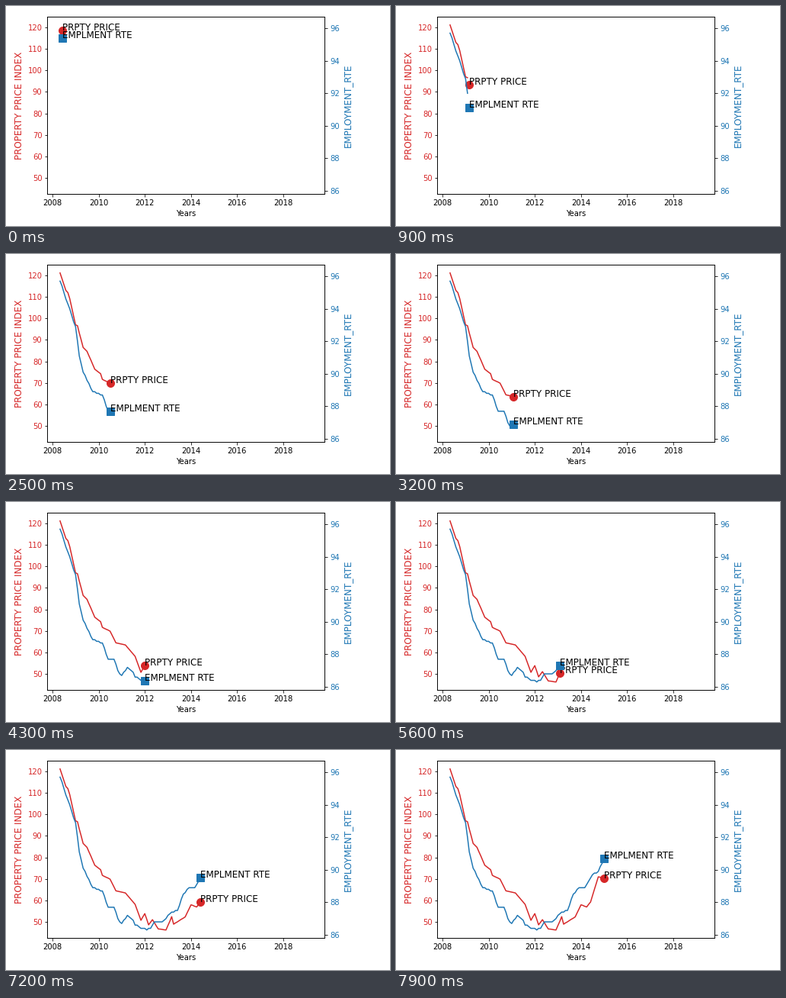
A matplotlib script for the animation above (8000 ms loop, 504 by 288 pixels).

```python
import numpy as np
import matplotlib.pyplot as plt
from matplotlib.animation import FuncAnimation

W, H, DPI = 504, 288, 72
FRAMES = 80


def days(dates):
    return np.array(dates, dtype="datetime64[D]").astype(float)


def curve(*knots):
    """Monthly readings to one decimal through (month, value) knots."""
    months, values = zip(*knots)
    return np.round(np.interp(np.arange(FRAMES + 1), months, values), 1)


def padded(lo, hi, margin=0.05):
    pad = (hi - lo) * margin
    return lo - pad, hi + pad


months = days(np.arange("2008-05", "2019-05", dtype="datetime64[M]"))

price = curve(
    (0, 121.1), (3, 113.0), (4, 112.0), (5, 109.2), (8, 97.0), (9, 96.6),
    (12, 86.5), (14, 84.7), (18, 76.4), (21, 74.3), (22, 71.7), (26, 69.9),
    (29, 64.5), (34, 63.5), (39, 58.2), (42, 50.8), (44, 53.9), (46, 48.7),
    (48, 51.1), (51, 46.8), (55, 46.3), (58, 52.5), (59, 49.0), (65, 52.4),
    (68, 58.0), (71, 57.0), (73, 59.3), (77, 71.0), (80, 70.3))

employment = curve(
    (0, 95.7), (4, 94.3), (8, 92.9), (10, 91.1), (12, 90.1), (17, 88.9),
    (22, 88.7), (25, 87.7), (28, 87.7), (30, 87.0), (32, 86.7), (35, 87.2),
    (38, 86.9), (39, 86.6), (45, 86.3), (47, 86.4), (49, 86.8), (53, 86.8),
    (58, 87.4), (61, 87.5), (64, 88.5), (67, 88.9), (70, 88.9), (74, 89.7),
    (77, 89.9), (80, 90.7))


class Series:
    """A growing line led by a marker with a caption."""

    def __init__(self, ax, values, color, marker, caption):
        self.values = values
        self.line, = ax.plot([], [], color=color, lw=1.5)
        self.head, = ax.plot([], [], color=color, marker=marker, ms=10, ls="")
        self.label = ax.text(months[0], values[0], caption, fontsize=12)

    def show(self, i):
        x, y = months[i + 1], self.values[i + 1]
        self.line.set_data(months[:i + 1], self.values[:i + 1])
        self.head.set_data([x], [y])
        self.label.set_position((x, y))
        return self.line, self.head, self.label


def style_y(ax, name, color, limits, ticks):
    ax.set_ylabel(name, color=color, fontsize=12)
    ax.tick_params(axis="y", labelcolor=color)
    ax.set_ylim(*limits)
    ax.set_yticks(ticks)


fig, left = plt.subplots(figsize=(W / DPI, H / DPI), dpi=DPI)
fig.subplots_adjust(left=54.4 / W, right=418.4 / W,
                    bottom=41.82 / H, top=273.72 / H)
right = left.twinx()

style_y(left, "PROPERTY PRICE INDEX", "tab:red",
        padded(46.3, 121.1), range(50, 121, 10))
style_y(right, "EMPLOYMENT_RTE", "tab:blue",
        padded(86.3, 96.2), range(86, 97, 2))

labels = [str(year) for year in range(2008, 2019, 2)]
left.set_xlabel("Years")
left.set_xlim(*padded(months[0], months[-1]))
left.set_xticks(days(labels), labels)

series = [
    Series(left, price, "tab:red", "o", "PRPTY PRICE"),
    Series(right, employment, "tab:blue", "s", "EMPLMENT RTE"),
]


def update(i):
    return [artist for s in series for artist in s.show(i)]


anim = FuncAnimation(fig, update, frames=FRAMES, interval=100,
                     init_func=lambda: update(0), repeat=True, repeat_delay=0)
plt.show()
```
